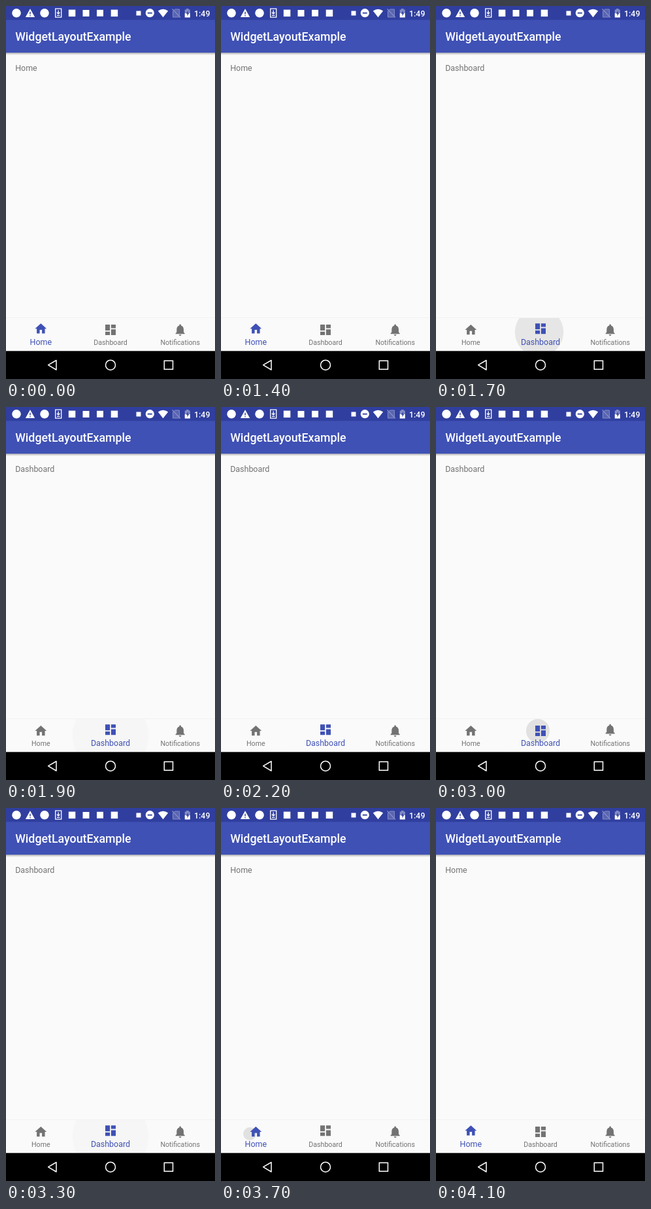
Animation of 320 by 569 pixels, one loop 4.3 s. Source, as an HTML page:

```html
<!DOCTYPE html>
<html lang="en">
<head>
<meta charset="utf-8">
<title>Bottom navigation</title>
<style>
  html, body { margin: 0; width: 100%; height: 100%; overflow: hidden; background: #fafafa; }
  svg { display: block; width: 100%; height: 100%; }
  text { font-family: Roboto, sans-serif; }
</style>
</head>
<body>
<svg viewBox="0 0 320 569">
  <defs>
    <linearGradient id="shade" x2="0" y2="1">
      <stop stop-color="#000" stop-opacity=".3"/>
      <stop offset="1" stop-color="#000" stop-opacity="0"/>
    </linearGradient>
    <clipPath id="barClip"><path d="M0 476H320V526.3H0z"/></clipPath>
  </defs>

  <rect width="320" height="569" fill="#fafafa"/>
  <rect y="71" width="320" height="4" fill="url(#shade)"/>
  <rect width="320" height="71.2" fill="#3f51b5"/>
  <rect width="320" height="21.3" fill="#303f9f"/>

  <!-- Status bar -->
  <g fill="#fff">
    <circle cx="16" cy="10.7" r="6.8"/>
    <path d="M37 4.2L44.2 17H29.8z"/>
    <path d="M37 8.8v4M37 14v1.5" stroke="#303f9f" stroke-width="1.4"/>
    <circle cx="59" cy="10.7" r="6.8"/>
    <path d="M75.7 4.2h9v13h-9zM80.2 6.5v5M77.9 9.7l2.3 2.3 2.3-2.3M78 14.4h4.4" fill="none" stroke="#fff" stroke-width="1.3"/>
    <rect x="95.8" y="5.6" width="10.5" height="10.5"/>
    <rect x="117.5" y="6" width="10" height="10"/>
    <rect x="139" y="5.8" width="10" height="10"/>
    <rect x="160.7" y="5.6" width="10.5" height="10.5"/>
    <rect x="199.5" y="7.5" width="7" height="7"/>
    <circle cx="220.3" cy="10.7" r="6.6"/>
    <path d="M216.8 10.7h7" stroke="#303f9f" stroke-width="1.8"/>
    <path d="M240.5 17.2L232.8 7.6Q240.5 1.8 248.2 7.6z"/>
    <g stroke="#838cc5" fill="#5965b2" stroke-width="1">
      <path d="M258.5 5H265.5V17H255.5V8z"/>
      <path d="M254.5 4.5L267 17.5" stroke-width="1.3"/>
    </g>
    <path d="M276 4h3.6v1.4h2.2V17.4H273.8V5.4H276z" fill="#838cc5"/>
    <path d="M273.8 11h8v6.4h-8z"/>
    <path d="M278.6 7l-2.8 4.8h1.8v3.6l2.8-4.8h-1.8z" fill="#303f9f"/>
    <text x="288" y="15.7" font-size="12.44" font-weight="500">1:49</text>
    <text x="14.2" y="52.8" font-size="17.78" font-weight="500">WidgetLayoutExample</text>
  </g>

  <text id="page" x="14.2" y="98.8" font-size="12.44" fill="#737373"></text>

  <!-- Bottom bar -->
  <rect y="475" width="320" height="1" fill="#f2f2f2"/>
  <g clip-path="url(#barClip)"><circle id="ripple"/></g>
  <g id="items"></g>

  <!-- System keys -->
  <rect y="526.3" width="320" height="42.7"/>
  <g fill="none" stroke="#fff" stroke-width="1.5">
    <path d="M64.6 547.7L77 540.5V555z" stroke-linejoin="round"/>
    <circle cx="160" cy="547.7" r="7.5"/>
    <rect x="242.3" y="541.2" width="13.2" height="13"/>
  </g>
</svg>
<script>
const LOOP = 4300, STEP = 100;
const ACTIVE = '#3f51b5', IDLE = '#737373';
const TABS = [
  ['Home', 'M10 20v-6h4v6h5v-8h3L12 3 2 12h3v8z'],
  ['Dashboard', 'M3 13h8V3H3zM3 21h8v-6H3zM13 21h8V11h-8zM13 3v6h8V3z'],
  ['Notifications', 'M12 22c1.1 0 2-.9 2-2h-4c0 1.1.89 2 2 2zm6-6v-5c0-3.07-1.64-5.64-4.5-6.32V4c0-.83-.67-1.5-1.5-1.5s-1.5.67-1.5 1.5v.68C7.63 5.36 6 7.92 6 11v5l-2 2v1h16v-1l-2-2z']
];
// Touch point and first ripple radius of each tap
const TAPS = [
  { at: 1600, tab: 1, x: 156, y: 494, r: 16 },
  { at: 2300, tab: 2, x: 262, y: 495, r: 16 },
  { at: 3000, tab: 1, x: 156, y: 494, r: 18 },
  { at: 3700, tab: 0, x: 44, y: 497, r: 10 }
];
const RIPPLE_ALPHA = [.1, .08, .045, .015];
const RIPPLE_R = 58.5, FADE = 400, SHIFT_TIME = 100;

const $ = id => document.getElementById(id);
const centre = tab => 320 * (tab + .5) / 3;
const mix = (a, b, k) => a + (b - a) * k;
const set = (el, attrs) => {
  for (const key in attrs) el.setAttribute(key, attrs[key]);
  return el;
};
const add = (parent, tag, attrs) =>
  parent.appendChild(set(document.createElementNS('http://www.w3.org/2000/svg', tag), attrs));

const items = TABS.map(([name, d], i) => {
  const icon = add($('items'), 'path', { d });
  const label = add($('items'), 'text', { x: centre(i), y: 517.2, 'text-anchor': 'middle' });
  label.textContent = name;
  return { icon, label };
});

function draw(time) {
  const t = Math.floor(time / STEP) * STEP;
  const done = TAPS.filter(tap => tap.at <= t);
  const tap = done[done.length - 1];
  const tab = tap ? tap.tab : 0;
  const before = done.length > 1 ? done[done.length - 2].tab : 0;
  const age = tap ? t - tap.at : Infinity;
  const shift = Math.min(1, age / SHIFT_TIME);

  $('page').textContent = TABS[tab][0];
  items.forEach(({ icon, label }, i) => {
    const on = i === tab;
    const lift = 1.78 * mix(i === before, on, shift);
    const fill = on ? ACTIVE : IDLE;
    set(icon, { fill, transform: `translate(${centre(i) - 10.67} ${483.4 - lift}) scale(.889)` });
    set(label, { fill, 'font-size': on ? 12.44 : 10.67 });
  });

  if (age < FADE) {
    const k = Math.min(1, age / 200);
    set($('ripple'), {
      cx: mix(tap.x, centre(tab), k),
      cy: mix(tap.y, 501.2, k),
      r: mix(tap.r, RIPPLE_R, k),
      opacity: RIPPLE_ALPHA[age / STEP]
    });
  } else {
    set($('ripple'), { r: 0 });
  }
}

const start = performance.now();
function tick() {
  draw((performance.now() - start) % LOOP);
  requestAnimationFrame(tick);
}
tick();
</script>
</body>
</html>
```
